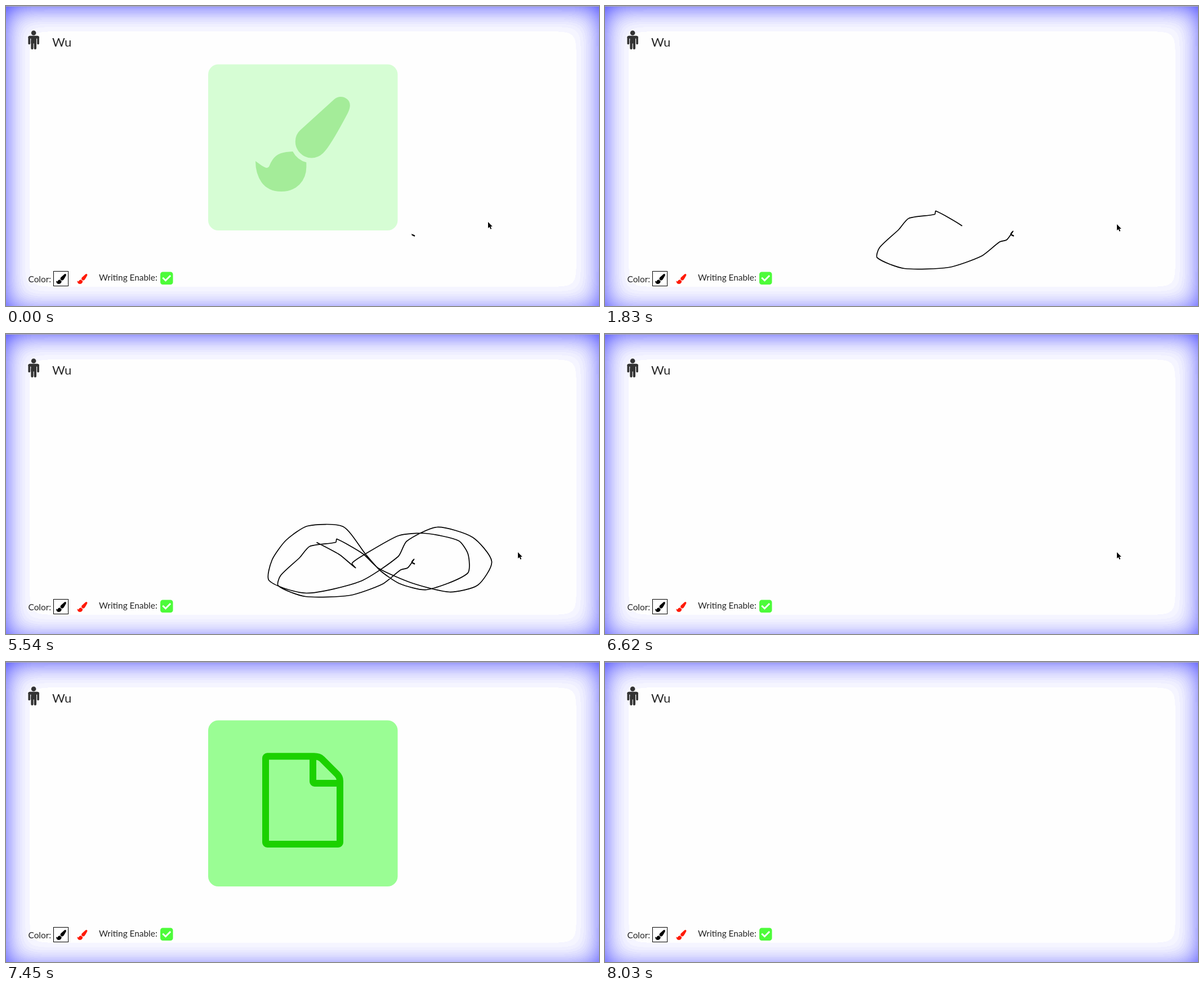
These frames come from a looping animation (1053 by 532 pixels, 8.31 s). An HTML page with a canvas:

```html
<!DOCTYPE html>
<html lang="en">
<head>
<meta charset="utf-8">
<title>Shared whiteboard</title>
<style>
  html, body { margin: 0; width: 100%; height: 100%; overflow: hidden; background: #fefefe; }
  canvas, svg { position: absolute; left: 0; top: 0; display: block; }
  text { font-family: Lato, "Open Sans", sans-serif; fill: #262626; }
</style>
</head>
<body>
<canvas id="glow" width="1053" height="532"></canvas>
<svg width="1053" height="532" viewBox="0 0 1053 532">
  <defs>
    <path id="brush" d="M1615 0q70 0 122.5 46.5t52.5 116.5q0 63-45 151-332 629-465 752-97 91-218 91-126 0-216.5-92.5t-90.5-219.5q0-128 92-212l638-579q59-54 130-54zm-909 1034q39 76 106.5 130t150.5 76l1 71q4 213-129.5 347t-348.5 134q-123 0-218-46.5t-152.5-127.5-86.5-183-29-220q7 5 41 30t62 44.5 59 36.5 46 17q41 0 55-37 25-66 57.5-112.5t69.5-76 88-47.5 103-25.5 125-10.5z"/>
  </defs>

  <g fill="#333">
    <circle cx="49.1" cy="47.8" r="4.3"/>
    <rect x="39.4" y="52.7" width="19.5" height="5" rx="3.5"/>
    <rect x="39.4" y="54" width="3.7" height="14.2" rx="1.8"/>
    <rect x="55.2" y="54" width="3.7" height="14.2" rx="1.8"/>
    <rect x="44.3" y="55" width="9.7" height="11.5"/>
    <rect x="44.3" y="60" width="4.3" height="17" rx="2.1"/>
    <rect x="49.7" y="60" width="4.3" height="17" rx="2.1"/>
  </g>
  <text x="82" y="71.5" font-size="22">Wu</text>

  <text x="39.5" y="489.5" font-size="15.4">Color:</text>
  <rect x="84.5" y="470.5" width="26" height="26" fill="#fff" stroke="#000"/>
  <use href="#brush" transform="translate(89 475) scale(.01)"/>
  <use href="#brush" fill="#ff1a05" transform="translate(126.5 475) scale(.01)"/>
  <text x="165" y="486.5" font-size="15.4">Writing Enable:</text>
  <rect x="274" y="471.5" width="22.5" height="22.5" rx="4.4" fill="#4dfb3a"/>
  <path d="M278.3 481.7L283.4 486.7L292.1 478" fill="none" stroke="#fff" stroke-width="3"/>

  <path id="ink" transform="translate(.5 .5)" fill="none" stroke="#000" stroke-width="1.7" stroke-linejoin="round"/>

  <g id="badge">
    <rect x="359" y="103.5" width="336.5" height="294.5" rx="18" fill="#9afd94"/>
    <use id="brushIcon" href="#brush" fill="#1bd100" transform="translate(443 161) scale(.09375)"/>
    <path id="pageIcon" fill="none" stroke="#1bd100" stroke-width="12"
      d="M547 167.3H464a3 3 0 0 0-3 3V320a3 3 0 0 0 3 3H590a3 3 0 0 0 3-3V211q0-7-5-12L561 172q-5-4.7-14-4.7zM545 167v45a3 3 0 0 0 3 3h45"/>
  </g>

  <path id="cursor" d="M0 0V11L2.6 8.7 4.4 12.8 6.2 12 4.5 8H7.8Z" stroke="#fff" stroke-width="1.2" paint-order="stroke"/>
</svg>

<script>
const LOOP = 8310, OPEN = 282, STEP = 119.05;
const $ = id => document.getElementById(id);
const show = (id, on) => $(id).style.display = on ? '' : 'none';

// Soft blue edge in fine bands: an inset shadow slightly larger than the stage.
function paintGlow() {
  const W = 1053, H = 532, SIGMA = 25, BAND = 0.025, ALPHA = 0.85;
  const phi = z => 1 / (1 + Math.exp(-1.5976 * z - 0.07056 * z ** 3));
  const profile = (size, before, after) => Array.from({ length: size }, (_, i) =>
    phi((i + before) / SIGMA) * phi((size - i + after) / SIGMA));
  const cols = profile(W, 5.5, 6.5), rows = profile(H, 2.5, 12.5);
  const ctx = $('glow').getContext('2d');
  const img = ctx.createImageData(W, H);
  for (let y = 0, p = 0; y < H; y++) {
    for (let x = 0; x < W; x++, p += 4) {
      const band = Math.floor(ALPHA * (1 - cols[x] * rows[y]) / BAND);
      const shade = band ? 255 * (1 - (band + 0.5) * BAND) : 254;
      img.data[p] = img.data[p + 1] = shade;
      img.data[p + 2] = band ? 255 : 254;
      img.data[p + 3] = 255;
    }
  }
  ctx.putImageData(img, 0, 0);
  ctx.fillStyle = '#aaa';
  ctx.fillRect(0, 0, W, 1);
}

// The hand-drawn eight: how many steps each sweep takes, and its key points.
const sweeps = [
  [0, '720,405 725,407 720,404'],
  [8, '724,399 713,414 700,418 668,443 610,463 531,465 483,446 487,428'],
  [4, '521,396 539,376 585,369 587,363 633,389'],
  [4, '661,415 720,441 787,457 837,445'],
  [8, '862,403 828,360 765,342 711,367 696,394 629,438 533,459 467,437'],
  [7, '472,400 497,365 535,340 598,341 638,390 664,419'],
  [7, '698,442 746,453 819,424 820,390 803,366 744,353 697,357 637,390'],
  [5, '614,406 620,414 592,391 551,369']
];

// Joins the points with gentle curves and notes the length at each sweep's end.
function buildInk() {
  const pts = sweeps.flatMap(([, s]) => s.split(' ').map(p => p.split(',').map(Number)));
  const gap = (a, b) => Math.hypot(b[0] - a[0], b[1] - a[1]);
  const handle = (i, reach) => {
    const a = pts[Math.max(i - 1, 0)], b = pts[Math.min(i + 1, pts.length - 1)];
    const k = reach / gap(a, b);
    return [pts[i][0] + (b[0] - a[0]) * k, pts[i][1] + (b[1] - a[1]) * k];
  };
  let d = 'M' + pts[0];
  const at = [0];
  for (let i = 1; i < pts.length; i++) {
    const reach = gap(pts[i - 1], pts[i]) * 0.22;
    d += `C${handle(i - 1, reach)} ${handle(i, -reach)} ${pts[i]}`;
    $('ink').setAttribute('d', d);
    at.push($('ink').getTotalLength());
  }
  let last = -1, tick = 1;
  return sweeps.map(([steps, s]) => {
    last += s.split(' ').length;
    tick += steps;
    return { tick, length: at[last] };
  });
}

function inkLength(t) {
  const tick = (t - OPEN) / STEP;
  const i = marks.findIndex(m => m.tick >= tick);
  if (i < 1) return i ? marks.at(-1).length : marks[0].length;
  const a = marks[i - 1], b = marks[i];
  return a.length + (b.length - a.length) * (tick - a.tick) / (b.tick - a.tick);
}

const swing = (t, start) => {
  const p = Math.min(1, Math.max(0, (t - start) / 400));
  return 0.5 - 0.5 * Math.cos(Math.PI * p);
};

function draw(t) {
  const early = t < 3000, leaving = t > 7300;
  $('badge').setAttribute('opacity', early
    ? 1 - swing(t, -228)
    : swing(t, 6597) * (1 - swing(t, 7620)));
  show('brushIcon', early);
  show('pageIcon', !early);

  show('ink', t < 6590);
  $('ink').setAttribute('stroke-dasharray', `${inkLength(t)} 9999`);

  const glide = 1 - (1 - Math.min(1, t / 300)) ** 3;
  const [x, y] = leaving ? [934, 480] : [856 + 53 * glide, 383 + 4 * glide];
  $('cursor').setAttribute('transform', `translate(${x} ${y})`);
  show('cursor', t < 7420);
}

// The picture is held between regular screen updates.
const held = ms => ms < OPEN
  ? Math.floor(ms / 120) * 120
  : OPEN + Math.floor((ms - OPEN) / STEP) * STEP;

paintGlow();
const marks = buildInk();
const begin = performance.now();
function tick() {
  draw(held((performance.now() - begin) % LOOP));
  requestAnimationFrame(tick);
}
tick();
</script>
</body>
</html>
```
